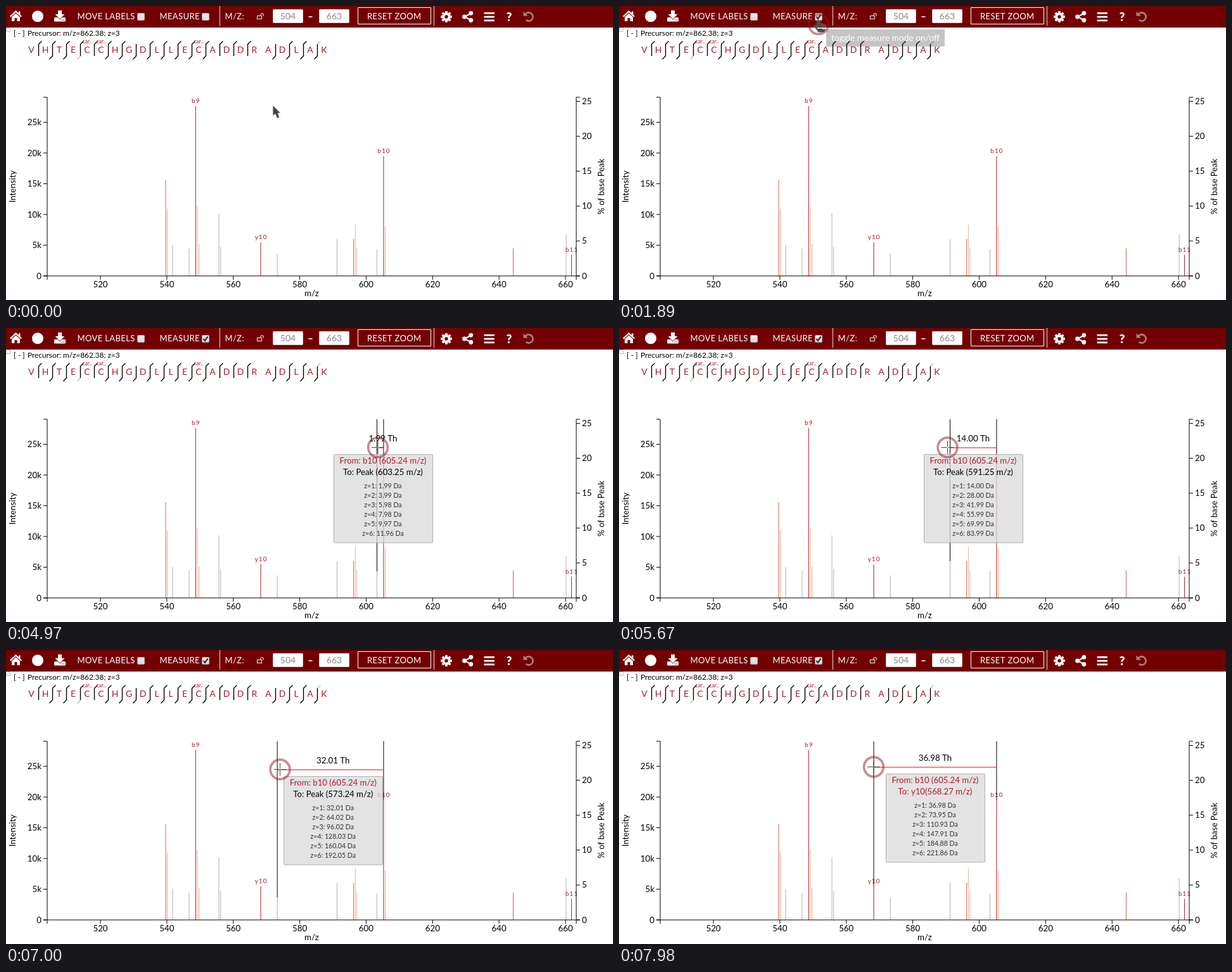
These frames come from a looping animation (958x464 px, 8000 ms). An HTML page with a canvas:

```html
<!DOCTYPE html>
<html lang="en">
<head>
<meta charset="utf-8">
<title>Spectrum measure mode</title>
<style>
html, body { margin: 0; width: 100%; height: 100%; overflow: hidden; background: #fff; }
canvas { display: block; width: 958px; height: 464px; }
</style>
</head>
<body>
<canvas id="stage" width="958" height="464"></canvas>
<script>
const ctx = document.getElementById('stage').getContext('2d');
const LOOP = 8000, STEP = 70;
const RED = '#b2182b', LOSS = '#d6604d', ISO = '#f4a582', GREY = '#b0b0b0';
const LEFT = 65, RIGHT = 900, TOP = 144, BASE = 426;
const DRAG_START = 4830;

// m/z, top of the peak, colour, fragment name, label shown
const peaks = [
  [539.65, 275, LOSS], [540.15, 320, ISO], [541.74, 377, GREY], [546.7, 383, GREY],
  [548.67, 158, RED, 'b9', 1], [549.17, 316, ISO], [549.68, 376, ISO],
  [555.67, 327, GREY], [556.2, 380.5, GREY], [568.2675, 373, RED, 'y10', 1],
  [573.236, 390.5, GREY], [591.246, 368, GREY],
  [596.24, 367.5, LOSS, 'b10_H20x1'], [596.74, 345, '#e3b394', 'b10_H20x1'],
  [597.2, 381, '#e3b394', 'b10_H20x1'], [603.25, 384, GREY],
  [605.244, 237, RED, 'b10', 1], [605.74, 348, ISO, 'b10'],
  [644.27, 382.5, LOSS], [660.2, 360.5, GREY], [661.82, 392.5, RED, 'b11', 1]
].map(([mz, top, color, name, label]) => ({ mz, top, color, name, label, x: xOf(mz) }));
const from = peaks.find(p => p.name === 'b10');

// time, x, y, eased
const track = [
  [350, 421, 157], [1120, 315, 29, 1], [2380, 315, 29], [3220, 549.5, 175.5, 1],
  [3710, 598.5, 186.5, 1], [4130, 598.5, 186.5], [4200, 597.5, 186.5], [4270, 597.5, 186.5],
  [4340, 597.5, 187.5], [4550, 597.5, 187.5], [4620, 596.5, 187.5], [4830, 596.5, 188],
  [4900, 594, 188.5], [4970, 587, 188.5], [5600, 522, 188.5], [5670, 518.5, 188.5],
  [6440, 465, 188.5], [7000, 432.5, 188.5], [7280, 423, 187.5], [7910, 402, 184.5]
];

function xOf(mz) { return 149 + (mz - 520) * 5.243; }
function mzOf(x) { return 520 + (x - 149) / 5.243; }
const clamp = v => Math.max(0, Math.min(1, v));

function pointer(t) {
  let a = track[0];
  for (const b of track) {
    if (t < b[0]) {
      if (a === b) break;
      let p = (t - a[0]) / (b[0] - a[0]);
      if (b[3]) p = (1 - Math.cos(Math.PI * p)) / 2;
      return [a[1] + (b[1] - a[1]) * p, a[2] + (b[2] - a[2]) * p];
    }
    a = b;
  }
  return [a[1], a[2]];
}

function text(s, x, y, size = 13.3, color = '#000', align = 'left', spacing = 0, weight = '') {
  ctx.font = `${weight} ${size}px Lato, sans-serif`;
  ctx.letterSpacing = spacing + 'px';
  ctx.textAlign = align;
  ctx.fillStyle = color;
  ctx.fillText(s, x, y);
}

function line(points, color = '#000', width = 1) {
  ctx.beginPath();
  for (let i = 0; i < points.length; i += 2) ctx.lineTo(points[i], points[i + 1]);
  ctx.strokeStyle = color;
  ctx.lineWidth = width;
  ctx.stroke();
}

function shape(points, fill, stroke) {
  ctx.beginPath();
  for (let i = 0; i < points.length; i += 2) ctx.lineTo(points[i], points[i + 1]);
  ctx.closePath();
  if (stroke) { ctx.strokeStyle = stroke; ctx.lineWidth = 1.5; ctx.stroke(); }
  ctx.fillStyle = fill;
  ctx.fill();
}

function box(x, y, w, h, r, fill, stroke) {
  ctx.beginPath();
  ctx.roundRect(x, y, w, h, r);
  if (fill) { ctx.fillStyle = fill; ctx.fill(); }
  if (stroke) { ctx.strokeStyle = stroke; ctx.lineWidth = 1; ctx.stroke(); }
}

function dot(x, y, r, color = '#fff') {
  ctx.beginPath();
  ctx.arc(x, y, r, 0, 7);
  ctx.fillStyle = color;
  ctx.fill();
}

function arc(x, y, r, a, b, color, width) {
  ctx.beginPath();
  ctx.arc(x, y, r, a, b);
  ctx.strokeStyle = color;
  ctx.lineWidth = width;
  ctx.stroke();
}

function rotated(s, x, y) {
  ctx.save();
  ctx.translate(x, y);
  ctx.rotate(-Math.PI / 2);
  text(s, 0, 0, 13.3, '#000', 'center');
  ctx.restore();
}

function checkbox(x, on) {
  const g = ctx.createLinearGradient(0, 11, 0, 23);
  g.addColorStop(0, '#eee');
  g.addColorStop(1, '#d8d8d8');
  box(x + 0.5, 11.5, 11, 11, 1.5, g, '#aaa');
  if (on) line([x + 2.5, 17, x + 5, 20, x + 9.5, 13.5], '#333', 2.2);
}

function icons() {
  const bar = '#730000';
  // home
  shape([15.5, 7, 25, 16, 23.5, 17.5, 15.5, 10, 7.5, 17.5, 6, 16], '#fff');
  ctx.fillRect(20, 8.5, 2.5, 5);
  shape([15.5, 11.5, 22, 17.5, 22, 24, 17.5, 24, 17.5, 19, 13.5, 19, 13.5, 24, 9, 24, 9, 17.5], '#fff');
  dot(50, 16.3, 9);
  // download
  box(76, 18, 18, 6.5, 1.5, '#fff');
  shape([82, 7, 88, 7, 88, 13, 92.5, 13, 85, 20.5, 77.5, 13, 82, 13], '#fff', bar);
  dot(88.5, 22, 0.8, bar);
  dot(91.3, 22, 0.8, bar);
  // open lock
  ctx.strokeStyle = '#ddd';
  ctx.lineWidth = 1.1;
  ctx.strokeRect(396.5, 15.5, 7, 5);
  arc(404, 14, 2.2, Math.PI, 0, '#ddd', 1.1);
  line([401.8, 14, 401.8, 15.5], '#ddd', 1.1);
  line([406.2, 14, 406.2, 16], '#ddd', 1.1);
  // gear
  ctx.save();
  ctx.translate(695, 17);
  ctx.fillStyle = '#fff';
  for (let i = 0; i < 8; i++) {
    ctx.fillRect(-1.9, -8.8, 3.8, 4);
    ctx.rotate(Math.PI / 4);
  }
  ctx.restore();
  arc(695, 17, 4.7, 0, 7, '#fff', 4);
  // share
  line([734, 11.5, 724, 17, 734, 22.5], '#fff', 2);
  dot(733.8, 11.3, 3.4);
  dot(723.5, 17, 3.4);
  dot(733.8, 22.5, 3.4);
  for (const y of [10, 15.7, 21.4]) box(754.5, y, 16.5, 2.8, 0.8, '#fff');
  text('?', 794, 23.5, 19, '#fff', 'center', 0, '900');
  // undo
  const dim = '#a98080';
  arc(825, 17, 6.6, -2.6, 2.3, dim, 2.6);
  shape([816.5, 8.5, 816.5, 15.8, 823.8, 15.8], dim);
}

function header(checked) {
  ctx.fillStyle = '#730000';
  ctx.fillRect(0, 0, 958, 34);
  icons();
  const caps = (s, x) => text(s, x, 21, 13, '#fff', 'left', 0.38);
  caps('MOVE LABELS', 112.5);
  checkbox(207, false);
  caps('MEASURE', 242.5);
  checkbox(309, checked);
  caps('M/Z:', 345.5);
  for (const x of [337.5, 675.5]) line([x, 0, x, 31], '#e8d8d8');
  for (const [s, x] of [['504', 421], ['663', 494]]) {
    box(x + 0.5, 5.5, 47, 21, 1, '#fff', '#ccc');
    text(s, x + 24, 21, 14, '#888', 'center');
  }
  line([477.5, 17, 483.5, 17], '#fff', 1.6);
  box(555.5, 2.5, 115, 26, 0, null, '#fff');
  caps('RESET ZOOM', 570);
}

function sequence() {
  box(0.5, 34.5, 6, 6, 0, '#fff', '#bbb');
  text('[ - ]', 12, 47, 11.85);
  text('Precursor: m/z=862.38; z=3', 34, 47, 11.85);
  const letters = 'VHTECCHGDLLECADDRADLAK';
  // per gap: t = upper tick, b = lower tick, x = both, u/l = faint upper/lower tick, - = none
  const gaps = 'txxltxxbxxxxxttt-bxxu';
  [...letters].forEach((c, i) => {
    const x = 40 + 22 * i;
    text(c, x, 74, 14, RED, 'center');
    if (c === 'C') text('car..', x, 59, 8.5, RED, 'center');
    const g = gaps[i];
    if (!g || g === '-') return;
    const bx = x + 11.5;
    line([bx, 60, bx, 79], '#000', 1.4);
    if ('txlu'.includes(g)) line([bx, 60.3, bx + 5, 55.5], g === 'u' ? '#bbb' : '#000', 1.3);
    if ('xblu'.includes(g)) line([bx, 78.7, bx - 5, 84], g === 'l' ? '#bbb' : '#000', 1.3);
  });
}

function chart() {
  for (const p of peaks) line([p.x, p.top, p.x, BASE], p.color);
  for (const p of peaks) if (p.label) text(p.name, p.x + 0.5, p.top - 5, 10, RED, 'center', 1);
  line([LEFT - 6, TOP, LEFT, TOP, LEFT, BASE, LEFT - 6, BASE]);
  line([RIGHT + 6, TOP, RIGHT, TOP, RIGHT, BASE, RIGHT + 6, BASE]);
  line([LEFT, BASE + 6, LEFT, BASE, RIGHT, BASE, RIGHT, BASE + 6]);
  for (let i = 0; i <= 5; i++) {
    const ly = BASE - 48.5 * i, ry = BASE - 55.1 * i;
    line([LEFT - 6, ly, LEFT, ly]);
    line([RIGHT, ry, RIGHT + 6, ry]);
    text(i ? 5 * i + 'k' : '0', 56, ly + 4.5, 13.3, '#000', 'right');
    text(5 * i, 909, ry + 4.5);
  }
  for (let mz = 520; mz <= 660; mz += 20) {
    const x = xOf(mz);
    line([x, BASE, x, BASE + 6]);
    text(mz, x, 444, 13.3, '#000', 'center');
  }
  text('m/z', 482.5, 458, 13.3, '#000', 'center');
  rotated('Intensity', 15, 285);
  rotated('% of base Peak', 944, 285);
}

function nearest(x) {
  let best = null, reach = 10;
  for (const p of peaks) {
    const d = Math.abs(p.x - x);
    if (p !== from && d < reach) { best = p; reach = d; }
  }
  return best;
}

function measure(t) {
  const [px, py] = pointer(t);
  const lagX = pointer(t - STEP)[0];
  const hit = nearest(px);
  const end = hit || { mz: mzOf(px), x: px, top: BASE, color: GREY };
  const diff = Math.abs(from.mz - end.mz);
  const mid = (lagX + from.x) / 2;
  const y = Math.round(py + 0.5);

  line([from.x, TOP, from.x, from.top]);
  line([end.x, TOP, end.x, end.top]);
  line([end.x, y, from.x, y], '#f00');
  text(diff.toFixed(2) + ' Th', mid, y - 10, 13.3, '#000', 'center');

  const fromText = `From: b10 (${from.mz.toFixed(2)} m/z)`;
  const toName = end.name || (hit ? 'Peak ' : '');
  const toText = `To: ${toName}(${end.mz.toFixed(2)} m/z)`;
  ctx.font = '13.2px Lato, sans-serif';
  ctx.letterSpacing = '0px';
  const w = Math.max(ctx.measureText(fromText).width, ctx.measureText(toText).width) + 20;
  box(Math.round(mid - w / 2) + 0.5, y + 10.5, Math.round(w) - 1, 139.5, 1, 'rgba(218,218,218,.76)', '#b0b0b0');
  text(fromText, mid, y + 25, 13.2, RED, 'center');
  text(toText, mid, y + 43, 13.2, end.name ? end.color : '#000', 'center');
  for (let z = 1; z <= 6; z++)
    text(`z=${z}: ${(diff * z).toFixed(2)} Da`, mid, y + 49 + 15 * z, 10.6, '#333', 'center');
}

function hint(t) {
  const alpha = 0.8 * Math.min(clamp((t - 1690) / 620), clamp((2870 - t) / 490));
  if (alpha <= 0) return;
  box(327, 37, 187, 27, 1, `rgba(30,30,30,${alpha})`);
  text('toggle measure mode on/off', 420.5, 55, 13.8, '#fff', 'center');
}

function cursor(x, y, checked) {
  ctx.save();
  ctx.translate(x, y);
  if (checked && y > TOP) {
    for (const s of [-1, 1]) {
      line([s, 0, s * 10, 0], '#444');
      line([0, s, 0, s * 10], '#444');
    }
  } else if (x < 326 && y < 36) {
    ctx.translate(-8, -8);
    ctx.beginPath();
    ctx.roundRect(5.5, 1, 4.5, 14, 2.2);
    ctx.roundRect(9, 6.5, 4.5, 8, 2);
    ctx.roundRect(12.5, 7.5, 4, 8, 2);
    ctx.roundRect(15.5, 8.5, 4, 7, 2);
    ctx.moveTo(5.5, 12);
    ctx.lineTo(3, 9.5);
    ctx.quadraticCurveTo(0.5, 9.5, 1, 11.5);
    ctx.lineTo(6, 18);
    ctx.lineTo(7.5, 20.5);
    ctx.lineTo(17, 20.5);
    ctx.lineTo(19.5, 15);
    ctx.lineTo(19.5, 11);
    ctx.closePath();
    ctx.strokeStyle = 'rgba(255,255,255,.35)';
    ctx.lineWidth = 1.2;
    ctx.stroke();
    ctx.fillStyle = '#4a4a4a';
    ctx.fill();
  } else {
    shape([0.5, 0.5, 0.5, 15.5, 4, 13, 7.5, 20, 10, 18.5, 7.5, 12, 11.5, 11.5], '#444', '#ddd');
  }
  ctx.restore();
}

function draw(time) {
  const t = Math.floor(time / STEP) * STEP;
  const [x, y] = pointer(t);
  const checked = t >= 1820;
  const dragging = t >= DRAG_START;
  ctx.fillStyle = '#fff';
  ctx.fillRect(0, 0, 958, 464);
  header(checked);
  sequence();
  chart();
  if (dragging) measure(t);
  hint(t);
  if (dragging || (t >= 1610 && t < 1960)) arc(x, y, 15.4, 0, 7, 'rgba(150,20,40,.5)', 3.6);
  cursor(x, y, checked);
}

const start = performance.now();
function tick() {
  draw((performance.now() - start) % LOOP);
  requestAnimationFrame(tick);
}
tick();
</script>
</body>
</html>
```
